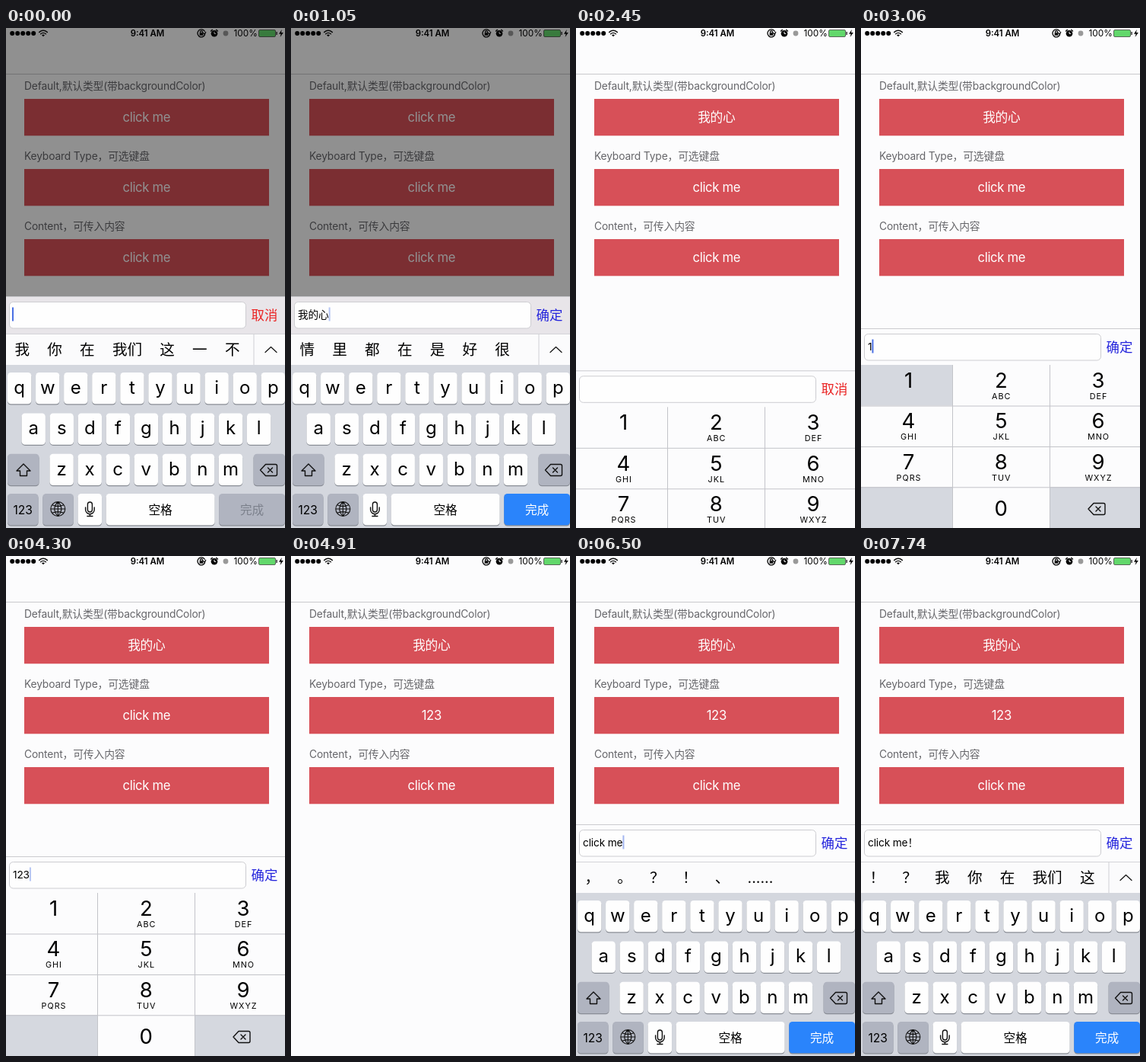
Recreate the animation shown at these times as an HTML page. Size 367 px wide and 656 px high, loop 8 s.

```html
<!DOCTYPE html>
<html lang="zh-CN">
<head>
<meta charset="utf-8">
<style>
html, body { margin: 0; width: 100%; height: 100%; overflow: hidden; background: #fcfcfd; }
svg { display: block; width: 367px; height: 656px; font-family: Inter, 'Noto Sans CJK SC', 'Noto Sans CJK', sans-serif; }
text { white-space: pre; }
.mid { text-anchor: middle; }
.line { fill: none; stroke: #111; stroke-width: 1.4; stroke-linecap: round; stroke-linejoin: round; }
</style>
</head>
<body>
<svg id="stage" viewBox="0 0 367 656"></svg>
<script>
const LOOP = 8000, STEP = 87.8;
const stage = document.getElementById('stage');
const $ = id => document.getElementById(id);

const rect = (x, y, w, h, fill, more = '') =>
  `<rect x="${x}" y="${y}" width="${w}" height="${h}" fill="${fill}" ${more}/>`;
const text = (x, y, size, str, more = '') =>
  `<text x="${x}" y="${y}" font-size="${size}" ${more}>${str}</text>`;
const path = (d, more = '') => `<path class="line" d="${d}" ${more}/>`;
const MID = 'class="mid"';

function statusBar() {
  let s = '';
  for (let i = 0; i < 5; i++) s += `<circle cx="${8.2 + i * 7}" cy="7" r="3"/>`;
  s += path('M43.6 5.6Q49 1 54.4 5.6M45.6 7.8Q49 5 52.4 7.8', 'stroke-width="1.7"');
  s += '<path d="M47 9.2Q49 7.8 51 9.2L49 11.3Z"/>';
  s += text(186, 11, 11.4, '9:41 AM', MID + ' font-weight="600"');
  s += path('M261.2 4.2A5 5 0 1 0 261.4 9.2M262.6 5.4L261.4 8.6L259.6 6.4', 'stroke-width="1"');
  s += rect(254.6, 6.2, 4.8, 3.6, '#111') + path('M255.6 6V5A1.4 1.4 0 0 1 258.4 5V6', 'stroke-width=".9"');
  s += '<circle cx="274" cy="7.3" r="4.3"/>' + path('M269.5 4L271.4 2.4M278.5 4L276.6 2.4');
  s += '<path d="M274 4.8V7.4H276" fill="none" stroke="#fff"/>';
  s += '<circle cx="289" cy="7" r="3.4" fill="#999"/>';
  s += text(299.5, 11, 11.8, '100%');
  s += rect(332.5, 2.5, 22, 9, '#62d86b', 'rx="1.5" stroke="#444" stroke-width=".8"') + rect(355.3, 5, 1.6, 4, '#444');
  s += '<path d="M362.8 2L359 7.8H361.6L360.6 12L364.8 6H362Z"/>';
  return s;
}

function page() {
  const titles = ['Default,默认类型(带backgroundColor)', 'Keyboard Type，可选键盘', 'Content，可传入内容'];
  let s = rect(0, 0, 367, 656, '#fcfcfd') + statusBar() + rect(0, 60, 367, 1, '#c9c9cc');
  titles.forEach((title, i) => {
    const y = 93 + i * 92;
    s += text(24, y - 12, 13.8, title, 'fill="#66666a" letter-spacing="-.15"');
    s += `<g id="btn${i}">${rect(24, y, 322, 48.3, '#d75058')}` +
      text(184.8, y + 30, 16.7, 'click me', `id="cap${i}" ${MID} fill="#fff" letter-spacing="-.35"`) + '</g>';
  });
  return s;
}

function key(x, y, w, label, size, fill = '#fefefe', id = '') {
  const base = size > 20 ? 28 : 26.5;
  return rect(x, y + 1, w, 41.5, '#898d95', 'rx="4.5"') +
    rect(x, y, w, 41.3, fill, `rx="4.5" ${id && `id="${id}"`}`) +
    (label ? text(x + w / 2, y + base, size, label, MID + (id ? ` id="${id}Text"` : '')) : '');
}

const eraser = (x, y) => path(`M${x - 11} ${y}L${x - 4} ${y - 7.5}H${x + 9}Q${x + 11} ${y - 7.5} ${x + 11} ${y - 5.5}V${y + 5.5}` +
  `Q${x + 11} ${y + 7.5} ${x + 9} ${y + 7.5}H${x - 4}ZM${x - 1} ${y - 3}l6 6m0 -6l-6 6`);

function letters() {
  const gray = '#b0b4c0';
  let s = rect(0, 49, 367, 41, '#fbfbfc') + rect(0, 49, 367, 1, '#d4d4d8') + '<g id="words"></g>';
  s += `<g id="more">${rect(325.5, 49, 1, 41, '#d0d0d4')}${path('M341 73.5L348.5 66.5L356 73.5', 'style="stroke-width:1.2"')}</g>`;
  s += rect(0, 90, 367, 215, '#d4d7de');
  [['qwertyuiop', 2, 100], ['asdfghjkl', 20.5, 153.4], ['zxcvbnm', 57.4, 206.8]].forEach(([row, x, y]) => {
    [...row].forEach((c, i) => s += key(x + i * 37.06, y, 31.4, c, 24));
  });
  s += key(2, 206.8, 41.5, '', 0, gray) + key(325.6, 206.8, 41.4, '', 0, gray);
  s += path('M23 220L32 229H27.5V235.5H18.5V229H14Z') + eraser(345.5, 228);
  s += key(2, 259, 40.5, '123', 15.6, gray) + key(48.3, 259, 40.5, '', 0, gray);
  s += key(94.5, 259, 31.6, '', 0) + key(131.6, 259, 143, '空格', 15.7);
  s += key(280.2, 259, 86.8, '完成', 15.7, gray, 'done');
  s += '<g transform="translate(68.3 279)">' + path('M-9.5 0A9.5 9.5 0 1 1 9.5 0A9.5 9.5 0 1 1 -9.5 0H9.5M0 -9.5V9.5' +
    'M0 -9.5Q-9 0 0 9.5Q9 0 0 -9.5M-7.6 -5.2Q0 -2 7.6 -5.2M-7.6 5.2Q0 2 7.6 5.2', 'style="stroke-width:1.1"') + '</g>';
  s += '<g transform="translate(110.4 279)">' + path('M-3 -6A3 3 0 0 1 3 -6V1A3 3 0 0 1 -3 1ZM-5.8 -2V1A5.8 5.8 0 0 0 5.8 1V-2M0 7V9.5M-3.5 9.5H3.5') + '</g>';
  return s;
}

function digits() {
  const marks = ['', 'ABC', 'DEF', 'GHI', 'JKL', 'MNO', 'PQRS', 'TUV', 'WXYZ'];
  const left = [0, 121, 249], wide = [120, 127, 118], mid = [62.5, 184.3, 312];
  let s = rect(0, 48, 367, 215, '#fcfcfd');
  marks.forEach((mark, i) => {
    const c = i % 3, y = 48 + Math.floor(i / 3) * 53.4;
    s += rect(left[c], y, wide[c], 53.4, '#d5d8df', `id="hit${i + 1}"`);
    s += text(mid[c], y + 30, 27.5, i + 1, MID) + text(mid[c] + .5, y + 45, 10.8, mark, MID + ' letter-spacing="1"');
  });
  s += rect(0, 208, 120, 55, '#d5d8df') + rect(249, 208, 118, 55, '#d5d8df');
  s += text(mid[1], 245.5, 27.5, 0, MID) + eraser(310, 237);
  [101.5, 155, 208.3].forEach(y => s += rect(0, y, 367, 1, '#c3c4c9'));
  return s + rect(120, 48, 1, 215, '#c3c4c9') + rect(248, 48, 1, 215, '#c3c4c9');
}

stage.innerHTML = page() + rect(0, 0, 367, 656, '#000', 'id="shade" opacity=".43"') +
  '<g id="sheet">' + rect(0, 0, 367, 49, '#fcfcfd', 'id="bar"') + rect(0, 0, 367, 1, '#cbcbcf') +
  rect(4.5, 7.5, 311, 34.5, '#fefefe', 'rx="5" stroke="#cdcdd1"') +
  text(9, 29, 13.7, '', 'id="entry" letter-spacing="-.15"') + rect(0, 14.5, 2, 18, '#4a70e4', 'id="caret"') +
  text(322.5, 31, 17.4, '', 'id="action"') +
  `<g id="letters">${letters()}</g><g id="digits">${digits()}</g></g>`;

const START = '我 你 在 我们 这 一 不';
const PUNCT = '， 。 ？ ！ 、 ......';

// Remaining distance of a critically damped slide begun at step n0.
function rest(n, n0) {
  const x = Math.max(0, (n - n0) * 1.58);
  return (1 + x) * Math.exp(-x);
}

// Value of the last [step, value] pair reached.
const at = (n, ...pairs) => pairs.reduce((v, p) => n >= p[0] ? p[1] : v, pairs[0][1]);

function scene(n) {
  if (n < 24) return {
    height: 304, dim: n < 15, away: n < 15 ? 0 : 1 - rest(n, 13.924),
    entry: at(n, [0, ''], [1, '我'], [4, '我的'], [6, '我的心']),
    words: at(n, [0, START], [1, '的 们 是 在 不 也 都'], [4, '心 人 生活 家 天 手 小'], [6, '情 里 都 在 是 好 很'], [15, '']),
    caret: at(n, [0, 1], [12, .4], [13, 0])
  };
  if (n < 61) return {
    height: 262, pad: true, away: n < 51 ? rest(n, 26.15) : 1 - rest(n, 49.924),
    entry: at(n, [0, ''], [34, '1'], [38, '12'], [42, '123']),
    hit: at(n, [0, 0], [34, 1], [36, 0], [38, 2], [39, 0], [42, 3], [44, 0]),
    caret: at(n, [0, 0], [32, .5], [33, 1], [49, .4], [50, 0])
  };
  return {
    height: 304, away: rest(n, 62.28),
    entry: n < 81 ? 'click me' : 'click me！',
    words: n < 81 ? PUNCT : '！ ？ 我 你 在 我们 这',
    caret: at(n, [0, 0], [68, .5], [69, 1], [74, .5], [75, 0], [76, .5], [77, 1], [85, .75], [86, .5], [87, .25], [88, 0])
  };
}

function wordRow(words) {
  let x = 11.5;
  return words.split(' ').filter(Boolean).map(w => {
    const s = text(x, 76.5, 19.6, w);
    x += w.length * 19.6 + 23.2;
    return s;
  }).join('');
}

const set = (id, name, value) => $(id).setAttribute(name, value);
const show = (id, on) => set(id, 'visibility', on ? 'inherit' : 'hidden');
let last = -1;

function draw(t) {
  const n = Math.min(90, Math.floor(t / STEP + .25));
  if (n === last) return;
  last = n;
  const s = scene(n);
  $('cap0').textContent = n < 15 ? 'click me' : '我的心';
  $('cap1').textContent = n < 51 ? 'click me' : '123';
  set('btn1', 'opacity', at(n, [0, 1], [24, .6], [26, .8], [27, .93], [28, 1]));
  set('btn2', 'opacity', at(n, [0, 1], [61, .6], [63, .85], [64, 1]));
  show('shade', s.dim);
  set('bar', 'fill', s.dim ? '#e8e5e9' : '#fcfcfd');
  set('sheet', 'transform', `translate(0 ${(656 - s.height * (1 - s.away)).toFixed(1)})`);
  show('sheet', s.away < .997);
  show('letters', !s.pad);
  show('digits', s.pad);
  $('entry').textContent = s.entry;
  const w = s.entry ? $('entry').getComputedTextLength() : -1;
  set('caret', 'x', 9 + w);
  set('caret', 'opacity', s.caret);
  $('action').textContent = s.entry ? '确定' : '取消';
  set('action', 'fill', s.entry ? '#2424dc' : '#ea2424');
  if (s.pad) {
    for (let i = 1; i < 10; i++) show('hit' + i, s.hit === i);
  } else {
    $('words').innerHTML = wordRow(s.words);
    show('more', s.words && s.words !== PUNCT);
    set('done', 'fill', s.entry ? '#2a84fb' : '#b0b4c0');
    set('doneText', 'fill', s.entry ? '#fff' : '#7c818c');
  }
}

const begin = performance.now();
function tick() {
  draw((performance.now() - begin) % LOOP);
  requestAnimationFrame(tick);
}
tick();
</script>
</body>
</html>
```
